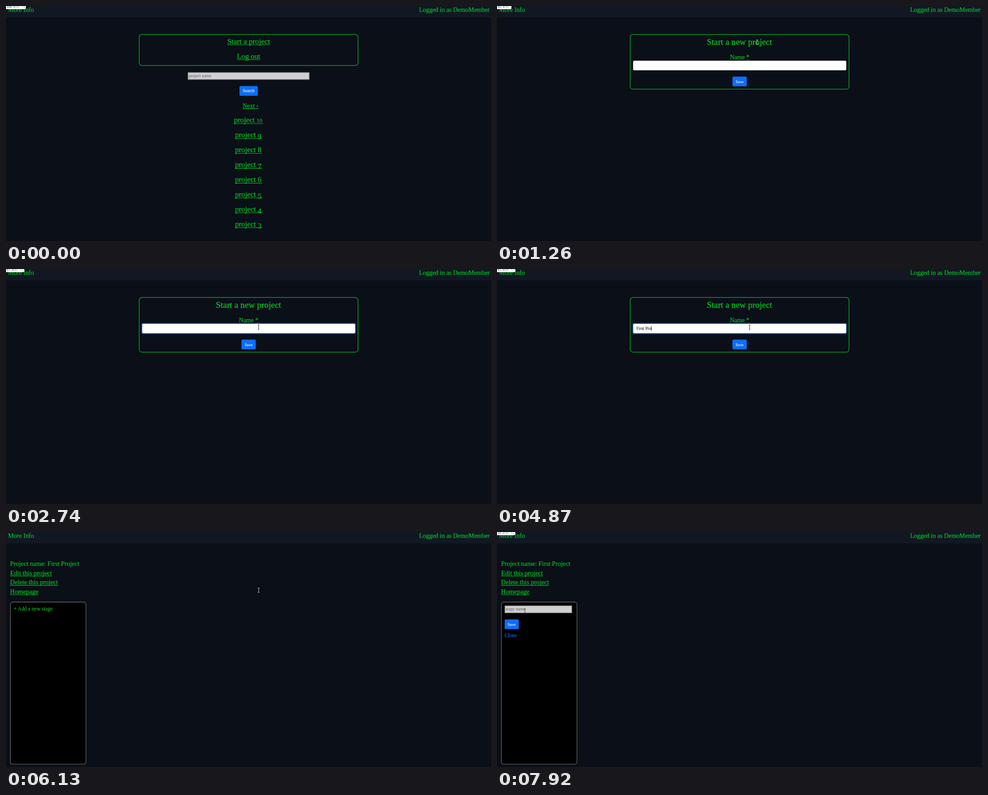
Write an HTML page that moves like this. It is 1076 px wide and 521 px high and loops after 8 s.

```html
<!DOCTYPE html>
<html lang="en">
<head>
<meta charset="utf-8">
<title>Project board</title>
<style>
  html, body { margin: 0; width: 100%; height: 100%; overflow: hidden; background: #0b0f17; }
  svg { display: block; width: 100vw; height: 100vh; }
  text { font-family: "Liberation Serif", serif; white-space: pre; }
  .mono { font-family: "Liberation Mono", monospace; font-size: 6.7px; }
</style>
</head>
<body>
<svg id="stage" viewBox="0 0 1076 521"></svg>
<script>
const GREEN = '#00cb20', BLUE = '#0d6efd', HOVER = '#0a58ca';
const LOOP = 8000;
const stage = document.getElementById('stage');

function add(parent, tag, attrs, content) {
  const node = document.createElementNS('http://www.w3.org/2000/svg', tag);
  for (const key in attrs) node.setAttribute(key, attrs[key]);
  if (content !== undefined) node.textContent = content;
  return parent.appendChild(node);
}
const group = (parent = stage) => add(parent, 'g', {});
const rect = (p, x, y, width, height, rx, fill, more = {}) =>
  add(p, 'rect', { x, y, width, height, rx, fill, ...more });
const label = (p, x, y, size, str, fill = GREEN, anchor = 'start') =>
  add(p, 'text', { x, y, 'font-size': size, fill, stroke: fill, 'stroke-width': size / 70, 'text-anchor': anchor }, str);
const rule = (p, x1, x2, y, stroke = GREEN) =>
  add(p, 'line', { x1, x2, y1: y, y2: y, stroke, 'stroke-width': 1.1 });
const show = (node, on) => node.setAttribute('display', on ? 'inline' : 'none');

function link(p, x1, x2, y, size, str) {
  const g = group(p);
  label(g, (x1 + x2) / 2, y, size, str, GREEN, 'middle');
  rule(g, x1, x2, y + 2);
  return g;
}
function button(p, x, y, w, str, size) {
  const g = group(p);
  rect(g, x, y, w, 21.5, 2.5, BLUE);
  label(g, x + w / 2, y + 14, size, str, '#fff', 'middle');
  return g;
}
function grayInput(p, x, y, w, h, str) {
  rect(p, x + .7, y + .7, w - 1.4, h - 1.4, 0, '#d0d0d0', { stroke: '#747474', 'stroke-width': 1.4 });
  label(p, x + 2.3, y + 11.4, 9.65, str, '#757575');
}
const panel = (p, height) =>
  rect(p, 295.5, 63.2, 485.5, height, 6, 'none', { stroke: '#08b827', 'stroke-width': 1.3 });

// Old-style figures: some digits hang below the line, 0 and 1 are small.
function projectLink(p, n, y) {
  const half = n > 9 ? 32.5 : 30;
  const text = label(p, 538.3 - half, y, 16.6, 'project ');
  const attrs = n > 9 ? { 'font-size': 12.6 } : { dy: n === 8 || n === 6 ? 0 : 3.6 };
  add(text, 'tspan', attrs, n);
  rule(p, 538.3 - half, 538.3 + half, y + 2.5);
}

// Top bar
rect(stage, 0, 0, 1076, 25.3, 0, '#111823');
label(stage, 4.5, 12.6, 14.1, 'More Info');
label(stage, 916.5, 12.6, 13.95, 'Logged in as DemoMember');

// Project list
const list = group();
panel(list, 68.6);
const startLink = link(list, 491, 585.5, 84, 16.9, 'Start a project');
link(list, 512.5, 564, 117, 16.5, 'Log out');
grayInput(list, 403, 146.7, 270.5, 17, 'project name');
button(list, 518, 177.4, 40.7, 'Search', 9.55);
link(list, 525, 560, 225.6, 13.9, 'Next ›');
for (let n = 10; n > 2; n--) projectLink(list, n, 258.3 + (10 - n) * 32.95);

// New project form
const form = group();
panel(form, 121.2);
label(form, 538, 85.6, 19.25, 'Start a new project', GREEN, 'middle');
label(form, 516.7, 117.5, 13.8, 'Name *');
add(form, 'line', { x1: 554.5, x2: 560, y1: 119.3, y2: 119.3, stroke: GREEN, 'stroke-dasharray': '1.1 1.1' });
const ring = rect(form, 299.2, 118.7, 478, 26.6, 4.5, BLUE);
rect(form, 302, 121.3, 472.8, 21.2, 2.5, '#fff');
const ringEdge = rect(form, 302.2, 121.5, 472.4, 20.8, 2.5, 'none', { stroke: '#86b7fe', 'stroke-width': .7 });
const typed = label(form, 309, 135, 9.55, '', '#212529');
const caret = rect(form, 309, 126.3, .9, 10.6, 0, '#111');
const save = button(form, 522.4, 156.5, 31.6, 'Save', 9);

// Project page
const board = group();
label(board, 9, 75.3, 14.4, 'Project name: First Project');
[['Edit this project', 102], ['Delete this project', 115.5], ['Homepage', 72]].forEach(([str, end], i) =>
  link(board, 9, end, 95.8 + i * 20.6, 14.5, str));
rect(board, 9.6, 155.4, 167.8, 359.4, 5, '#000', { stroke: '#777', 'stroke-width': 1.1 });
const addStage = label(board, 17, 173.8, 11.68, '+ Add a new stage');
const stageForm = group(board);
grayInput(stageForm, 16.7, 162.8, 150, 17.2, 'stage name');
button(stageForm, 17, 193.7, 31.2, 'Save', 9);
label(stageForm, 17, 233, 11.8, 'Close', BLUE);

// Timing badge
const badge = group();
const badgeBox = rect(badge, -5, -9, 45, 16, 3, '#fff');
const badgeTime = add(badge, 'text', { class: 'mono', x: 1, y: 4, fill: '#223f7d' });
const badgeUnit = add(badge, 'text', { class: 'mono', y: 4, fill: '#999' });

// Pointers, each drawn around its hot spot
const cursor = group();
const outlined = { fill: '#fff', stroke: '#000', 'stroke-width': .7, 'stroke-linejoin': 'round' };
const pointers = {
  arrow: add(cursor, 'path', { d: 'M0 0V11L2.6 8.6L4.3 12.4L6 11.6L4.4 7.9H8Z', ...outlined }),
  hand: add(cursor, 'path', {
    d: 'M-1 1Q0 -.8 1 1V5L5.5 6Q6.8 6.4 6.7 8L6 11.5V14H-1V12L-4 8Q-4 6.3 -2.5 7L-1 8.5Z', ...outlined }),
  beam: add(cursor, 'path', {
    d: 'M-2 -5H-.6Q0 -5 0 -4.4Q0 -5 .6 -5H2M0 -4.6V4.6M-2 5H-.6Q0 5 0 4.4Q0 5 .6 5H2',
    fill: 'none', 'stroke-width': .9 })
};

// [time, x, y]
const moves = [
  [120, 1065, 545], [190, 1028, 515], [450, 850, 330], [720, 640, 130], [930, 577, 80],
  [1390, 577, 80], [1850, 556, 131], [1930, 557, 130], [2150, 560.5, 129],
  [6850, 560.5, 129], [7160, 170, 187], [7250, 80, 189], [7330, 62, 175.5]
];
function pointAt(t) {
  const i = moves.findIndex(m => m[0] > t);
  if (i === 0) return [moves[0][1], moves[0][2]];
  if (i < 0) return moves[moves.length - 1].slice(1);
  const [a, b] = [moves[i - 1], moves[i]];
  const k = (t - a[0]) / (b[0] - a[0]);
  return [1, 2].map(j => a[j] + (b[j] - a[j]) * k);
}
function pointerAt(t, x, y) {
  if (t < 1200) return x < 586 && y < 90 ? 'hand' : 'arrow';
  if (t < 1390) return 'beam';
  if (t < 6850) return y < 89 || y > 121 ? 'beam' : 'arrow';
  if (t < 7660) return x < 104 && y < 179 ? 'hand' : 'arrow';
  return t < 7920 ? '' : 'beam';
}

const NAME = 'First Project';
const keys = [3140, 3470, 3600, 3800, 3900, 4000, 4470, 4800, 4870, 5260, 5330, 5530, 5600];

// [start, time, unit, width]
const badges = [
  [0, '168.6', 'ms ×3', 44], [1200, ''], [1260, '42.6', 'ms', 32],
  [1320, '47.0', 'ms ×2', 40.5], [6130, ''], [6190, '33.2', 'ms ×2', 40.5]
];

function draw(t) {
  show(list, t < 1200);
  show(form, t >= 1200 && t < 6130);
  show(board, t >= 6130);
  show(addStage, t < 7530);
  show(stageForm, t >= 7530);

  const [x, y] = pointAt(t);
  const kind = pointerAt(t, x, y);
  const tint = kind === 'hand' && t < 1200 ? HOVER : GREEN;
  startLink.firstChild.setAttribute('fill', tint);
  startLink.firstChild.setAttribute('stroke', tint);
  startLink.lastChild.setAttribute('stroke', tint);

  const focus = Math.min(1, Math.max(0, (t - 2200) / 150));
  ring.setAttribute('opacity', focus * .28);
  ringEdge.setAttribute('opacity', focus);
  save.setAttribute('opacity', t < 5930 ? 1 : .65);

  const str = NAME.slice(0, keys.filter(k => k <= t).length);
  if (typed.textContent !== str) typed.textContent = str;
  const onForm = t >= 2240 && t < 6130;
  show(caret, onForm && (t < 2740 || t >= 3140));
  if (onForm) caret.setAttribute('x', 309 + (str ? typed.getComputedTextLength() : 0));

  const [, time, unit, width] = badges.filter(b => b[0] <= t).pop();
  show(badge, time);
  if (time) {
    badgeBox.setAttribute('width', width + 5);
    badgeTime.textContent = time;
    badgeUnit.textContent = unit;
    badgeUnit.setAttribute('x', time.length * 4 + 2.4);
  }

  for (const name in pointers) show(pointers[name], name === kind);
  const onInput = (t >= 1390 && t < 6130 && y > 121) || t >= 7920;
  pointers.beam.setAttribute('stroke', onInput ? '#222' : '#e4e4e4');
  cursor.setAttribute('transform', `translate(${x.toFixed(2)} ${y.toFixed(2)})`);
}

function tick() {
  draw(performance.now() % LOOP);
  requestAnimationFrame(tick);
}
tick();
</script>
</body>
</html>
```
